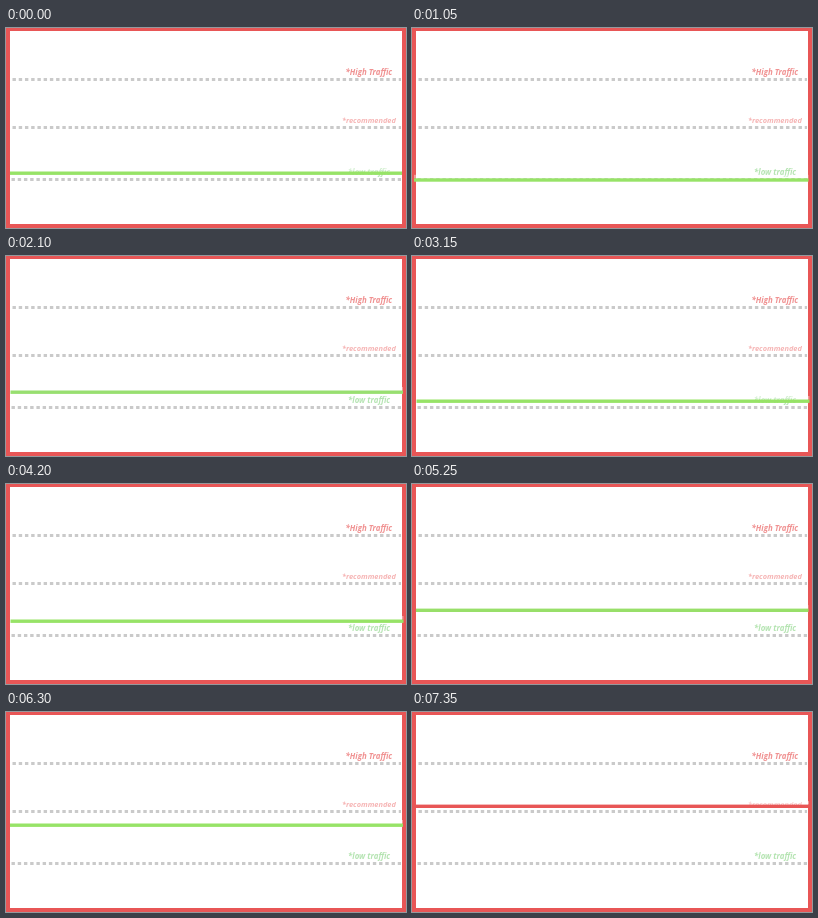
Animation, 400 px wide and 200 px high, one loop 8 s. Source, as an HTML page with a canvas:

```html
<!DOCTYPE html>
<html lang="en">
<head>
<meta charset="utf-8">
<title>Traffic level</title>
<style>
  html, body { margin: 0; width: 100%; height: 100%; overflow: hidden; background: #fff; }
  canvas { display: block; width: 400px; height: 200px; }
</style>
</head>
<body>
<canvas id="stage"></canvas>
<script>
const W = 400, H = 200, LOOP = 8000, STEP = 1050;
const RED = '#e85656', GREEN = '#97e367';

const canvas = document.getElementById('stage');
const ctx = canvas.getContext('2d');
const scale = window.devicePixelRatio || 1;
canvas.width = W * scale;
canvas.height = H * scale;
ctx.scale(scale, scale);

// The level jumps once per step: left, right, top, colour
const levels = [
  [4, 396, 143.5, GREEN],
  [2, 396.5, 150.3, GREEN],
  [4.5, 397, 134.5, '#98df70'],
  [4.5, 397.5, 143.5, GREEN],
  [4.5, 397.5, 135.5, GREEN],
  [4, 396.5, 124.6, '#98df69'],
  [4, 397, 111.5, GREEN],
  [4, 397, 92.6, RED]
];

function rect(x, y, w, h, color) {
  ctx.fillStyle = color;
  ctx.fillRect(x, y, w, h);
}

function dots(x, y) {
  ctx.strokeStyle = '#cacaca';
  ctx.lineWidth = 3;
  ctx.setLineDash([3.4, 2.83]);
  ctx.beginPath();
  ctx.moveTo(x, y);
  ctx.lineTo(395, y);
  ctx.stroke();
}

function label(text, x, y, size, color) {
  ctx.font = `italic bold ${size}px "Open Sans", "Noto Sans", sans-serif`;
  ctx.fillStyle = color;
  ctx.fillText(text, x, y);
}

function drawLevel([left, right, top, color]) {
  rect(left, top - 3.5, right - left, 3.5, 'rgba(255,255,255,0.4)');
  rect(left, top, right - left, 3.4, color);
}

function draw(time) {
  rect(0, 0, W, H, RED);
  rect(4, 3, 392, 193, '#fff');
  dots(6.5, 51.5);
  dots(6.5, 99.5);
  dots(5.5, 151.5);
  label('*High Traffic', 339.5, 47, 7.9, '#f09292');
  label('*recommended', 336, 95, 7.4, '#f6b5b5');
  label('*low traffic', 342, 147, 7.9, '#b5e4b2');
  drawLevel(levels[Math.floor((time % LOOP) / STEP)]);
}

const start = performance.now();
function tick() {
  draw(performance.now() - start);
  requestAnimationFrame(tick);
}
tick();
</script>
</body>
</html>
```
